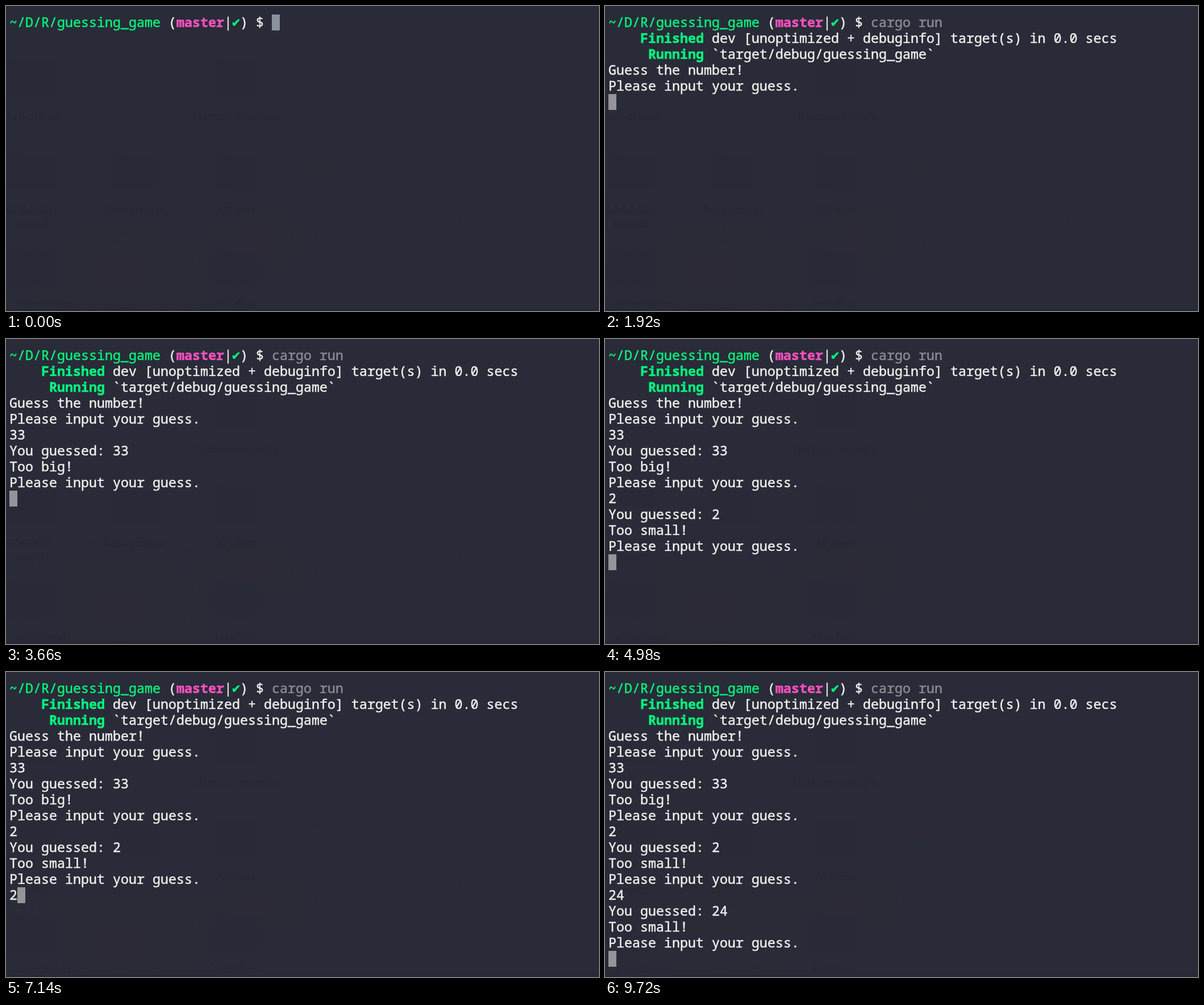
Write an HTML page that moves like this. It is 1044 px wide and 537 px high and loops after 9780 ms.

```html
<!DOCTYPE html>
<html lang="en">
<head>
<meta charset="utf-8">
<title>Guessing game</title>
<style>
  :root { --bg: #292b38; }
  html, body { margin: 0; width: 100%; height: 100%; overflow: hidden; background: var(--bg); }
  #stage { position: relative; width: 1044px; height: 537px; overflow: hidden; background: var(--bg); }
  #desk { position: absolute; inset: 0; opacity: .45; }
  #desk text { font: 600 18px "Open Sans", sans-serif; fill: #242633; text-anchor: middle; }
  #screen {
    position: absolute; left: 6px; top: 14px; margin: 0;
    font: 23.333px/28px "Noto Sans Mono", "DejaVu Sans Mono", monospace;
    color: #f0f0ec; font-variant-ligatures: none;
    -webkit-text-stroke: .5px;
  }
  #screen div { height: 28px; width: max-content; white-space: pre; background: var(--bg); }
  #cursor { position: absolute; left: 6px; top: 15px; width: 14px; height: 28px; background: #949499; }
  #cursor.start { background: #8c91a0; }
  .path, .ok, .tick { color: #05f77e; }
  .ok, .branch { font-weight: 700; }
  .branch { color: #ff50c0; }
  .tick { display: inline-block; width: 14px; height: 28px; vertical-align: top; font-family: "DejaVu Sans Mono", monospace; }
  .cmd { color: #8b8c94; }
</style>
</head>
<body>
<div id="stage">
  <svg id="desk" width="1044" height="537">
    <defs>
      <radialGradient id="glow">
        <stop offset="0" stop-color="#3a2a36" stop-opacity=".5"/>
        <stop offset="1" stop-color="#3a2a36" stop-opacity="0"/>
      </radialGradient>
      <path id="folder" d="M0 4q0-4 4-4h18l6 5h54q4 0 4 4v53q0 4-4 4H4q-4 0-4-4z" fill="#272936"/>
    </defs>
    <g fill="url(#glow)">
      <ellipse cx="200" cy="470" rx="250" ry="120"/>
      <ellipse cx="440" cy="410" rx="130" ry="90"/>
      <ellipse cx="553" cy="284" rx="34" ry="24"/>
      <ellipse cx="755" cy="342" rx="16" ry="14"/>
      <ellipse cx="808" cy="378" rx="14" ry="14"/>
    </g>
    <use href="#folder" x="2" y="92"/><use href="#folder" x="362" y="92"/>
    <use href="#folder" x="2" y="258"/><use href="#folder" x="182" y="258"/><use href="#folder" x="362" y="258"/>
    <use href="#folder" x="2" y="426"/><use href="#folder" x="362" y="426"/>
    <text x="46" y="201">shell-project</text><text x="405" y="201">Electron-example</text>
    <text x="46" y="366">GOGOGO--</text><text x="46" y="390">project</text>
    <text x="225" y="366">Rust-project</text><text x="405" y="366">API-test</text>
    <text x="66" y="530">animations</text><text x="405" y="530">test-files</text>
    <rect y="533" width="1044" height="4" fill="#242633"/>
  </svg>
  <div id="screen"></div>
  <div id="cursor"></div>
</div>
<script>
const LOOP = 9780, CELL = 14, ROW = 28;
const screenEl = document.getElementById('screen');
const cursorEl = document.getElementById('cursor');

const PROMPT = '<span class="path">~/D/R/guessing_game</span> (<span class="branch">master</span>|<span class="tick">✔</span>) $ ';
const PROMPT_COLS = 33;
const ASK = 'Please input your guess.\n';
const label = (pad, word) => ' '.repeat(pad) + `<span class="ok">${word}</span>`;
const reply = (n, verdict) => `You guessed: ${n}\nToo ${verdict}!\n${ASK}`;

// Each event: time in ms, text added, column the cursor then stands at
const events = [[0, PROMPT, PROMPT_COLS]];
[...'cargo run'].forEach((ch, i) =>
  events.push([120 + i * 84, `<span class="cmd">${ch}</span>`, PROMPT_COLS + i + 1]));
events.push(
  [960, '\n', 0],
  [1200, label(4, 'Finished') + ' dev [unoptimized + debuginfo] target(s) in 0.0 secs\n', 0],
  [1260, label(5, 'Running') + ' `target/debug/guessing_game`\nGuess the number!\n' + ASK, 0],
  [3180, '3', 1],
  [3300, '3', 2],
  [3540, '\n' + reply(33, 'big'), 0],
  [4440, '2', 1],
  [4740, '\n' + reply(2, 'small'), 0],
  [6960, '2', 1],
  [7260, '4', 2],
  [7620, '\n' + reply(24, 'small'), 0]
);

let shown = 0;
function draw(now) {
  const t = now % LOOP;
  const count = events.filter(([at]) => at <= t).length;
  if (count !== shown) {
    shown = count;
    const lines = events.slice(0, count).map(e => e[1]).join('').split('\n');
    screenEl.innerHTML = lines.map(line => `<div>${line}</div>`).join('');
    const x = events[count - 1][2] * CELL, y = (lines.length - 1) * ROW;
    cursorEl.style.transform = `translate(${x}px, ${y}px)`;
    cursorEl.className = count === 1 ? 'start' : '';
  }
  requestAnimationFrame(() => draw(performance.now()));
}
draw(performance.now());
</script>
</body>
</html>
```
